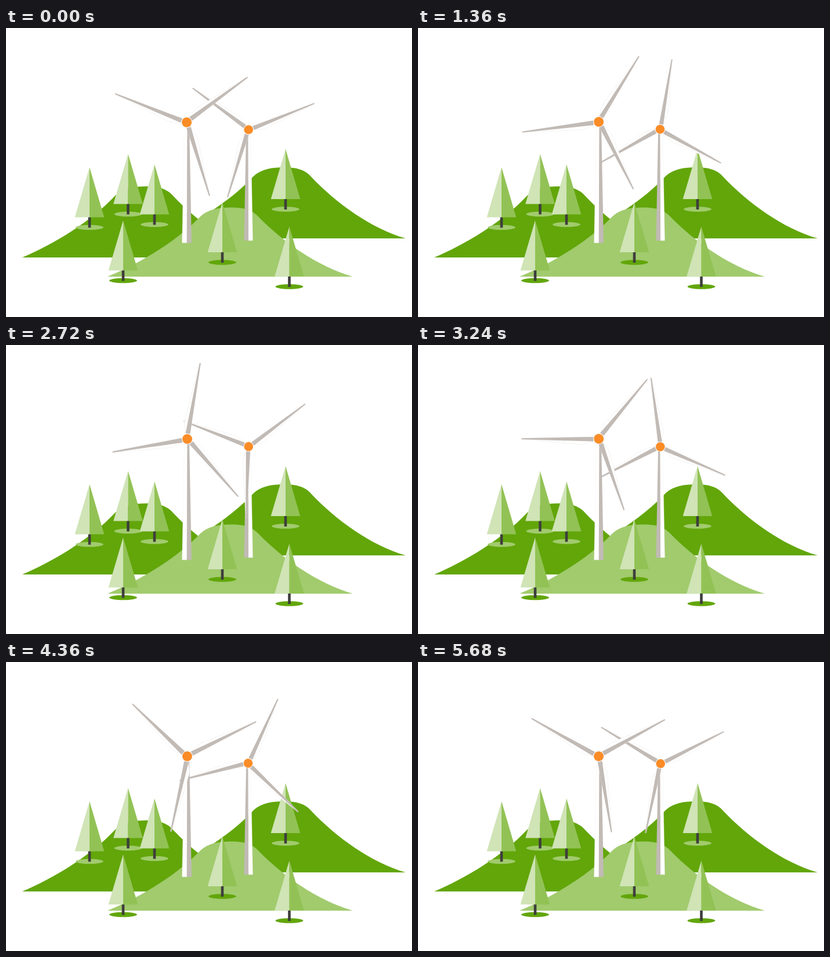
Animation of 700 by 500 pixels, one loop 5720 ms. Source, as an HTML page:

```html
<!DOCTYPE html>
<html lang="en">
<head>
<meta charset="utf-8">
<title>Wind turbines</title>
<style>
html, body { margin: 0; width: 100%; height: 100%; overflow: hidden; background: #fff; }
svg { display: block; width: 700px; height: 500px; }
</style>
</head>
<body>
<svg id="stage" viewBox="0 0 700 500"></svg>
<script>
const DARK = '#62a60a', LIGHT = '#a1cb6d', GREY = '#c1bab5', ORANGE = '#fb8c26';
const FRAME = 40, FRAMES = 143;

const hill = (x, y, height, color) => `
  <path transform="translate(${x} ${y}) scale(1 ${height / 122})" fill="${color}"
    d="M-212 122C-160 100-95 62-52 16C-38 3-20 0 2 0C24 0 38 5 48 16C92 62 150 104 211 122Z"/>`;

const tree = (x, y, shadow) => `
  <g transform="translate(${x} ${y})">
    <ellipse cy="104" rx="24" ry="4.2" fill="${shadow}"/>
    <path d="M-2.3 86h4.6v18.5h-4.6z" fill="#3e3e3c"/>
    <path d="M0 0V86.5H-25.3Z" fill="#d0e4b6"/>
    <path d="M0 0V86.5H25.3Z" fill="#92c255"/>
  </g>`;

const blade = (angle, length) => `
  <g transform="rotate(${angle}) scale(${length / 133} 1)">
    <path d="M9-4.4C16-5 21-9.8 31-9.8L133-1L133 .6L9 3.2Z" fill="#fff" stroke="#ebe8e6" stroke-width=".5"/>
    <path d="M9.5-4.5L132-1.2Q134-.4 132.5 .8L9.5 3.3Z" fill="${GREY}"/>
  </g>`;

const turbine = (id, x, y, sx, sy) => `
  <g transform="translate(${x} ${y}) scale(${sx} ${sy})">
    <path d="M-4.5 5H.5L0 209H-8.3Z" fill="#fff" stroke="#f1efee" stroke-width=".4"/>
    <path d="M.5 5H4L8 209H-.3Z" fill="${GREY}"/>
    <g id="${id}">
      <g transform="translate(-.4 .4)">
        ${blade(72.9, 133.2)}${blade(201.9, 133)}${blade(323.4, 130.8)}
        <circle r="9.4" fill="#f4efeb"/>
        <circle r="8.4" fill="${ORANGE}"/>
      </g>
    </g>
  </g>`;

const backTrees = [[144, 241], [210.5, 218], [256, 236], [482, 209.5]];
const frontTrees = [[202, 333], [373, 301.5], [488.5, 343.5]];

document.getElementById('stage').innerHTML =
  hill(240, 274, 123, DARK) +
  hill(478, 241, 123, DARK) +
  hill(387, 310.5, 119.7, LIGHT) +
  backTrees.map(([x, y]) => tree(x, y, LIGHT)).join('') +
  frontTrees.map(([x, y]) => tree(x, y, DARK)).join('') +
  turbine('right', 417.8, 175.5, -.92, .92) +
  turbine('left', 312, 162.8, 1, 1);

// Each turn ends on its starting pose, which is held for one extra step.
function spin(id, frame, steps) {
  const angle = -360 * (frame % steps) / (steps - 1);
  document.getElementById(id).setAttribute('transform', `rotate(${angle})`);
}

const start = performance.now();
function draw() {
  const frame = Math.floor((performance.now() - start) / FRAME) % FRAMES;
  spin('left', frame, 48);
  spin('right', frame, 72);
  requestAnimationFrame(draw);
}
draw();
</script>
</body>
</html>
```
